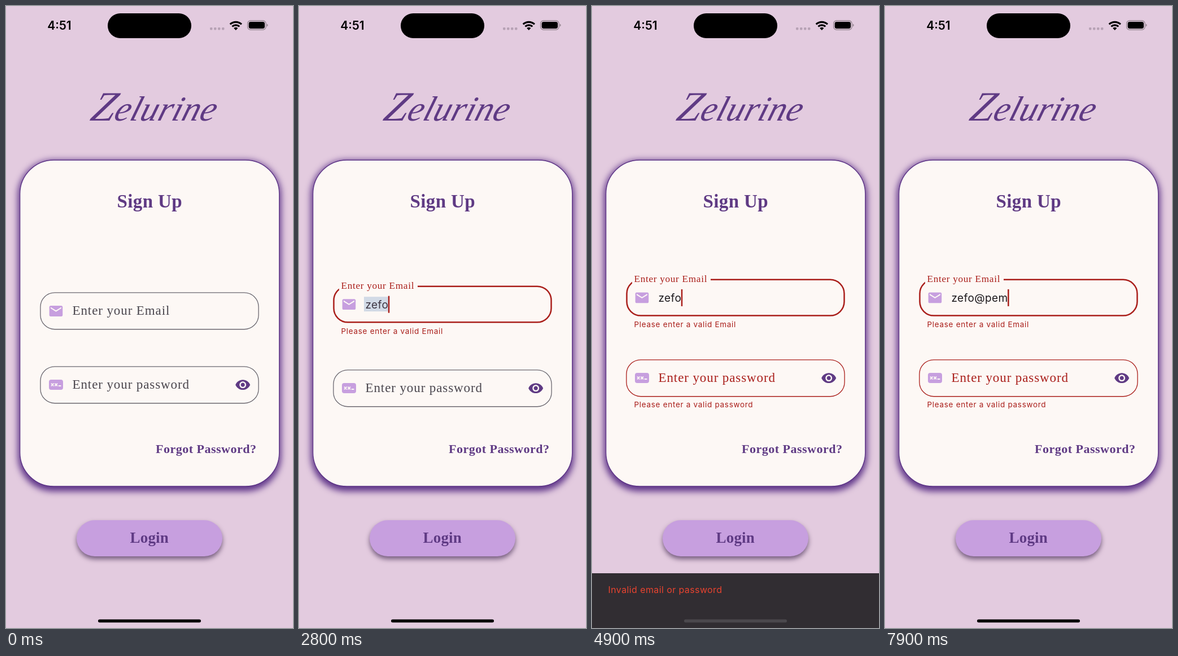
Recreate the animation shown at these times as an HTML page. Size 508 by 1102 pixels, loop 8 s.

```html
<!DOCTYPE html>
<html lang="en">
<head>
<meta charset="utf-8">
<title>Sign up form</title>
<style>
  :root { --ink: #5f3a84; --card: #fdf8f5; --lilac: #c79fdf; --error: #aa1f1b; }
  html, body { margin: 0; width: 100%; height: 100%; overflow: hidden; background: #e3cbdf; }
  svg { display: block; width: 508px; height: 1102px; }
  .serif { font-family: "Liberation Serif", "Times New Roman", serif; }
  .sans { font-family: Inter, Roboto, sans-serif; }
  .brand { font-style: italic; font-size: 62px; letter-spacing: .5px; fill: var(--ink); }
  .bold { font-weight: 700; fill: var(--ink); }
  .label { font-size: 23px; letter-spacing: .9px; }
  .hint { font-size: 17px; letter-spacing: .7px; fill: #56505a; }
  .value { font-size: 19px; letter-spacing: .4px; }
  .note { font-size: 13.5px; letter-spacing: .7px; fill: var(--error); }
  .card { fill: var(--card); stroke: #5b3285; stroke-width: 1.3; }
  .glow { fill: #5f3589; filter: blur(6px); }
  .box { fill: none; stroke: #6b6870; }
  .lilac { fill: var(--lilac); }
</style>
</head>
<body>
<svg viewBox="0 0 508 1102">
  <defs>
    <clipPath id="pill"><rect x="125" y="911" width="258" height="64" rx="32"/></clipPath>
  </defs>
  <rect width="508" height="1102" fill="#e3cbdf"/>

  <!-- status bar -->
  <text class="sans" x="73.3" y="42" font-size="21" font-weight="600">4:51</text>
  <rect x="180" y="13" width="148" height="44" rx="22"/>
  <g fill="#b7a2b5">
    <rect x="361" y="38" width="4.4" height="4.4" rx="1.4"/>
    <rect x="368" y="38" width="4.4" height="4.4" rx="1.4"/>
    <rect x="375" y="38" width="4.4" height="4.4" rx="1.4"/>
    <rect x="382" y="38" width="4.4" height="4.4" rx="1.4"/>
  </g>
  <g fill="none" stroke="#000" stroke-width="3.2">
    <path d="M396.7 32.4a14.6 14.6 0 0 1 20.2 0"/>
    <path d="M400.4 36.4a9.2 9.2 0 0 1 12.8 0"/>
  </g>
  <path d="M403.2 39.2a5.3 5.3 0 0 1 7.2 0L406.8 43z"/>
  <rect x="427.6" y="26" width="32.4" height="16" rx="5" fill="none" stroke="#94858f" stroke-width="1.3"/>
  <rect x="429.6" y="28" width="28.4" height="12" rx="3.4"/>
  <path d="M461.6 31.4q2 .8 2 2.6t-2 2.6z" fill="#94858f"/>

  <text class="serif brand" transform="translate(147 203) skewX(-17)"><tspan font-size="74">Z</tspan>elurine</text>

  <rect class="glow" x="21" y="273" width="466" height="587" rx="63"/>
  <rect class="card" x="24.7" y="273" width="459" height="578" rx="60"/>
  <text class="serif bold" x="196.5" y="357" font-size="33" letter-spacing=".4">Sign Up</text>

  <g id="email">
    <rect class="box" id="emailBox"/>
    <rect id="notch" x="71" y="503" height="12.5" fill="#fdf8f5"/>
    <path class="lilac" transform="translate(74.3 526.3) scale(1.18)"
      d="M20 4H4c-1.1 0-2 .9-2 2v12c0 1.1.9 2 2 2h16c1.1 0 2-.9 2-2V6c0-1.1-.9-2-2-2zm0 4l-8 5-8-5V6l8 5 8-5v2z"/>
    <rect id="selection" x="115" y="527" height="26" fill="#d2dae6"/>
    <text class="serif hint" id="hint" x="117.5" y="547">Email</text>
    <text class="sans value" id="value" x="117.5" y="547.6"></text>
    <rect id="caret" y="525.5" width="2.5" height="30"/>
    <text class="serif label" id="label">Enter your Email</text>
    <text class="sans note" id="emailNote" x="74.5" y="592.5">Please enter a valid Email</text>
  </g>

  <g id="password">
    <rect class="box" id="passBox"/>
    <rect class="lilac" x="76" y="662" width="25" height="18" rx="4"/>
    <path d="M80 668.7l4.6 4.6m0-4.6l-4.6 4.6M86.4 668.7l4.6 4.6m0-4.6l-4.6 4.6M92.8 673h4.6"
      stroke="#fdf8f5" stroke-width="1.8"/>
    <text class="serif label" id="passLabel" x="117.5" y="678">Enter your password</text>
    <path fill="#5f3a84" transform="translate(405 657) scale(1.18)"
      d="M12 4.5C7 4.5 2.73 7.61 1 12c1.73 4.39 6 7.5 11 7.5s9.27-3.11 11-7.5c-1.73-4.39-6-7.5-11-7.5zM12 17c-2.76 0-5-2.24-5-5s2.24-5 5-5 5 2.24 5 5-2.24 5-5 5zm0-8c-1.66 0-3 1.34-3 3s1.34 3 3 3 3-1.34 3-3-1.34-3-3-3z"/>
    <text class="sans note" id="passNote" x="74.5" y="723.3">Please enter a valid password</text>
  </g>

  <text class="serif bold" x="265" y="792" font-size="22" letter-spacing=".5">Forgot Password?</text>

  <rect class="lilac" id="button" x="125" y="911" width="258" height="64" rx="32"/>
  <g clip-path="url(#pill)">
    <rect id="press" x="125" y="911" width="258" height="64" fill="#a274d8"/>
    <circle id="ripple" cx="238.5" cy="938" fill="#7b70b4"/>
  </g>
  <text class="serif bold" x="219.5" y="951" font-size="27" letter-spacing=".2">Login</text>

  <g id="snack">
    <rect y="1005" width="508" height="97" fill="#312d32"/>
    <text class="sans" x="28.5" y="1039.5" font-size="16" letter-spacing=".4" fill="#e8432f">Invalid email or password</text>
  </g>
  <rect id="home" x="163" y="1086.8" width="182" height="5.4" rx="2.7"/>
</svg>

<script>
const LOOP = 8000, STEP = 100;
const FOCUS = 850, ERROR = 1500, SELECT = 2700, PRESS = 4000, SUBMIT = 4400,
      DESELECT = 4700, DISMISS = 7550;
const ADDRESS = "zefo@pem";
const KEYS = [1500, 1700, 1900, 2200, 6400, 7100, 7300, 7600];
const RED = [170, 31, 27], GREY = [74, 70, 78], VIOLET = [104, 76, 156];

const el = {};
document.querySelectorAll("[id]").forEach(n => el[n.id] = n);

const clamp = x => Math.min(1, Math.max(0, x));
const ramp = (t, from, length) => clamp((t - from) / length);
const ease = x => x * x * (3 - 2 * x);
const lerp = (a, b, p) => a + (b - a) * p;
const mix = (a, b, p) => `rgb(${a.map((v, i) => Math.round(lerp(v, b[i], p)))})`;
const set = (node, attrs) => {
  for (const k in attrs) node.setAttribute(k, attrs[k]);
};
const show = (node, opacity) => { node.style.opacity = +opacity; };
const shift = (node, y) => set(node, { transform: `translate(0 ${y})` });

// the border grows inwards from a fixed outer edge
function outline(node, top, weight) {
  const inset = weight / 2;
  set(node, {
    x: 60.3 + inset, y: top + inset, width: 387.4 - weight, height: 66.2 - weight,
    rx: 26 - inset, "stroke-width": weight
  });
}

function drawEmail(t) {
  const focus = ease(ramp(t, FOCUS, 167));
  const failed = t >= ERROR;
  const selected = t >= SELECT && t < DESELECT;
  const typed = KEYS.filter(k => k <= t).length;

  shift(el.email, t >= SUBMIT ? -23.6 : failed ? -11.8 : 0);
  outline(el.emailBox, 507.2, lerp(1.3, 2.5, focus));
  el.emailBox.style.stroke = failed ? "var(--error)" : mix([107, 104, 112], [91, 71, 149], focus);
  set(el.notch, { width: 139 * focus });
  set(el.label, {
    transform: `translate(${lerp(117.5, 74.5, focus)} ${lerp(547, 513, focus)}) scale(${lerp(1, .75, focus)})`,
    fill: failed ? mix(VIOLET, RED, 1) : mix(GREY, VIOLET, focus)
  });
  show(el.hint, typed ? 0 : focus);
  show(el.emailNote, ramp(t, ERROR - 50, 167));

  el.value.textContent = ADDRESS.slice(0, typed);
  set(el.value, { fill: selected ? "#3d3542" : "#1b181c" });
  const width = typed ? el.value.getComputedTextLength() : 0;
  set(el.selection, { width: width + 4.5 });
  show(el.selection, selected);

  // the blink restarts on focus, on selection and on every key
  const last = Math.max(...[900, SELECT, ...KEYS].filter(k => k <= t));
  set(el.caret, { x: 117 + width, fill: failed ? "#aa1f1b" : "#5b4795" });
  show(el.caret, t >= 900 && (t - last) % 1000 < 500);
}

function drawPassword(t) {
  const failed = t >= SUBMIT;
  shift(el.password, failed ? -12 : t >= ERROR ? 6 : 0);
  outline(el.passBox, 638.2, 1.3);
  el.passBox.style.stroke = failed ? "var(--error)" : "";
  set(el.passLabel, { fill: mix(GREY, RED, failed ? 1 : 0) });
  show(el.passNote, ramp(t, SUBMIT - 50, 167));
}

function drawButton(t) {
  const down = ramp(t, PRESS, 200) * (1 - ramp(t, SUBMIT, 200));
  const spread = ramp(t, SUBMIT, 225);
  el.button.style.filter =
    `drop-shadow(0 ${lerp(5, 9, down)}px ${lerp(4, 7, down)}px rgba(52,26,68,.62))`;
  show(el.press, .13 * down);
  set(el.ripple, { r: t < PRESS ? 0 : 25 + .09 * (Math.min(t, SUBMIT) - PRESS) + 140 * spread });
  show(el.ripple, t < PRESS ? 0 : .17 * (1 - spread));
}

function drawSnack(t) {
  const open = ease(ramp(t, SUBMIT - 50, 250)) * (1 - ease(ramp(t, DISMISS, 250)));
  shift(el.snack, 97 * (1 - open));
  const light = ramp(t, 4450, 300) * (1 - ramp(t, DISMISS + 50, 250));
  set(el.home, { fill: mix([0, 0, 0], [75, 72, 77], light) });
}

const start = performance.now();
function frame() {
  const now = Math.max(0, performance.now() - start) % LOOP;
  const t = Math.floor(now / STEP) * STEP;
  drawEmail(t);
  drawPassword(t);
  drawButton(t);
  drawSnack(t);
  requestAnimationFrame(frame);
}
frame();
</script>
</body>
</html>
```
